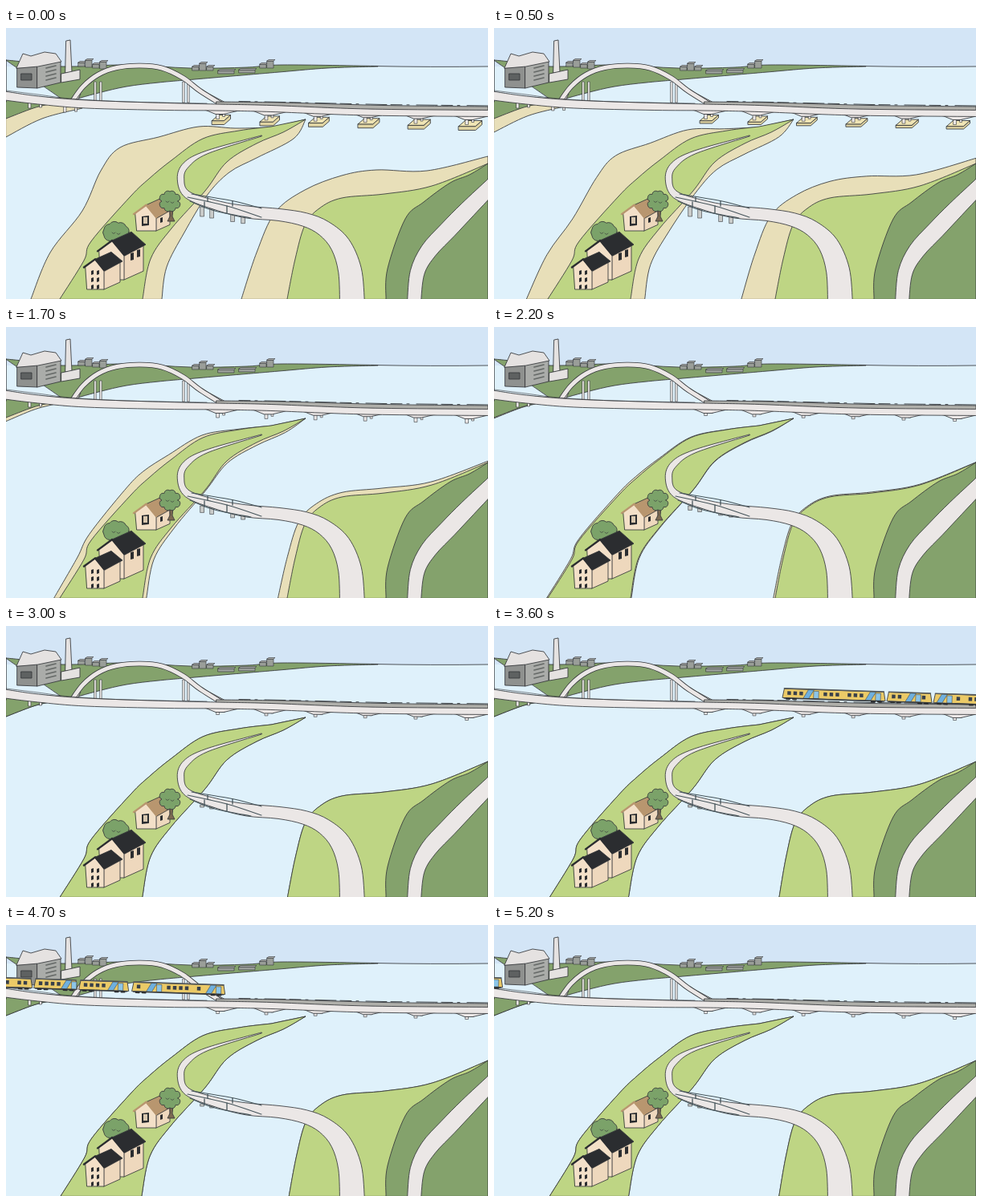
An HTML page for the animation above (5.3 s loop, 600 by 338 pixels).

```html
<!DOCTYPE html>
<html lang="en">
<head>
<meta charset="utf-8">
<title>Rising water</title>
<style>
html, body { margin: 0; width: 100%; height: 100%; overflow: hidden; background: #dff1fb; }
svg { display: block; width: 100vw; height: 100vh; }
path { stroke: #34373a; stroke-width: .85; stroke-linejoin: round; stroke-linecap: round; }
</style>
</head>
<body>
<svg id="stage" viewBox="0 0 600 338" preserveAspectRatio="none"></svg>
<script>
const NS = 'http://www.w3.org/2000/svg', LOOP = 5300, STEP = 100;
const stage = document.getElementById('stage');
const WATER = '#dff1fb', SAND = '#e8dfb9', LIGHT = '#bed584', DARK = '#84a26c', LEAF = '#7ba269',
      ROAD = '#ebe7e6', GREY = '#afafaa', WALL = '#f3e0c8', SIDE = '#eed8bd', INK = '#2b2d30';
const BARE = { stroke: 'none' }, THIN = { strokeWidth: '.6' };

const clamp = v => Math.max(0, Math.min(1, v));
const pts = s => s.split(' ').map(p => p.split(',').map(Number));
const poly = p => 'M' + p.map(q => q.join(' ')).join('L') + 'Z';
const box = (x, y, w, h) => `M${x} ${y}h${w}v${h}h${-w}Z`;
const mix = (a, b, k) => a.map((p, i) => p.map((v, j) => v + (b[i][j] - v) * k));

// Catmull-Rom spline through the points
function curve(p, start = 'M') {
  let d = start + p[0][0] + ' ' + p[0][1];
  for (let i = 0; i < p.length - 1; i++) {
    const a = p[i - 1] || p[i], b = p[i], c = p[i + 1], e = p[i + 2] || c;
    const n = [b[0] + (c[0] - a[0]) / 6, b[1] + (c[1] - a[1]) / 6,
               c[0] - (e[0] - b[0]) / 6, c[1] - (e[1] - b[1]) / 6, c[0], c[1]];
    d += 'C' + n.map(v => v.toFixed(2)).join(' ');
  }
  return d;
}
const ring = (a, b) => curve(a) + curve(b, 'L') + 'Z';

// Outline of a band along x,y,width points
function ribbon(s) {
  const p = pts(s);
  const edge = side => p.map(([x, y, w], i) => {
    const a = p[i - 1] || p[i], b = p[i + 1] || p[i];
    const dx = b[0] - a[0], dy = b[1] - a[1], k = side * w / 2 / Math.hypot(dx, dy);
    return [x - dy * k, y + dx * k];
  });
  return ring(edge(1), edge(-1).reverse());
}

const group = () => stage.appendChild(document.createElementNS(NS, 'g'));
function shape(d, fill = 'none', style = {}, parent = stage) {
  const el = document.createElementNS(NS, 'path');
  el.setAttribute('d', d);
  el.setAttribute('fill', fill);
  Object.assign(el.style, style);
  return parent.appendChild(el);
}

// Each shore runs from a dry edge to the edge of the grass
const shore = (dry, grass) => ({ dry: pts(dry), grass: pts(grass) });
const west = shore('0,136 45,113 95,100', '0,113 34,100 58,94');
const east = shore('293,338 312,280 335,230 372,202 418,184 461,177 524,178 600,160',
                   '350,338 360,288 372,246 390,225 418,212 471,207 530,197 600,169');
const isleLeft = shore('31,338 55,280 95,228 118,178 142,149 190,136 240,123 285,125 330,124',
                       '67,338 97,290 106,266 155,210 178,188 206,165 245,138 290,128 330,123');
const isleRight = shore('373,114 358,138 312,162 278,180 250,209 222,255 200,298 194,338',
                        '373,114 345,130 312,144 275,167 248,203 206,250 180,288 170,338');

// Sky, water and far land
shape(box(0, 0, 600, 338), WATER, BARE);
shape(box(0, 0, 600, 48), '#d3e5f6', BARE);
shape('M455 47.5Q530 49 600 48');
const westSand = shape('', SAND), westGrass = shape('', DARK);
shape(ring(pts('0,40 20,42 70,48 150,46 230,50 300,49 345,46 463,47.5'),
           pts('463,48 400,50 340,55 235,64 190,68 150,73 115,81 75,92')) + 'L0 92Z', DARK);

// Skyline clusters
for (const [x0, y0, n] of [[90, 48, 4], [232, 53, 3], [264, 57, 1], [290, 56, 1], [316, 50, 2]]) {
  for (let i = 0; i < n; i++) {
    const w = n === 1 ? 20 : 8, h = n === 1 ? 4 : 5 + 4 * (i % 2), x = x0 + i * 9, y = y0 - h + (n > 3 ? i : 0);
    shape(box(x, y, w, h), '#9a9e99', THIN);
    shape(`M${x} ${y}l2 -1.5h${w}l-2 1.5Z`, '#b9bbb7', THIN);
  }
}

// Factory
shape(poly(pts('75,16 80,15 82,55 74,56')), '#e5e2e1');
shape(poly(pts('69,57 92,52 92,64 69,68')), '#e5e2e1');
shape(poly(pts('14,49 39,46 39,75 14,74')), '#8f918f');
shape(poly(pts('39,46 68,41 68,68 39,75')), '#aaaca9');
shape(poly(pts('13,50 21,32 31,35 48,30 62,32 69,42 40,48')), '#e5e2e1');
shape(box(19, 57, 13, 8), '#5e6161');
for (let y = 50; y < 70; y += 5) shape(`M50 ${y}l12 -3`, 'none', { stroke: '#656967', strokeWidth: '1.7' });

// Arch
for (const x of [110, 117, 220, 226]) shape(box(x, 67, 2.2, 26), ROAD, THIN);
shape(poly(pts('237,78 245,78 275,94 264,95')), ROAD);
shape(poly(pts('88,83 93,82 88,93 78,92')), ROAD);
const arch = curve(pts('82,92 96,73 115,58 138,49.5 167,47 194,50 220,62 241,78 268,95'));
shape(arch, 'none', { strokeWidth: '6.6' });
shape(arch, 'none', { stroke: ROAD, strokeWidth: '5' });

// Piers get wider towards the right
const piers = Array.from({ length: 6 }, (_, i) => {
  const x = 268 + 60 * i + i * i * .4;
  return { x, y: 103.5 + 1.4 * i, w: 11.5 + .6 * i,
           side: shape('', '#e0d4a2'), top: shape('', '#efe4b4'), legs: shape('', ROAD, THIN) };
});
const westPosts = shape('', ROAD, THIN);

// Deck
shape(curve(pts('262,92 345,93 470,96.5 600,98')) + 'V106L262 97Z', GREY);
shape('M290 91.5L345 92.5L470 95.5L600 97', 'none', { stroke: INK, strokeDasharray: '14 6 3 9 26 5' });
for (const { x, y } of piers) shape(`M${x - 24} ${y - 3}L${x - 7} ${y + 4}h10L${x + 24} ${y - 1}Z`, ROAD);
shape(ribbon('-5,84,11 40,90,10 100,95,10 200,98,9 262,99,8 330,100.5,8 450,105,8 605,106.5,8'), ROAD);
shape(curve(pts('0,78 40,83 80,88 150,92 250,94')), 'none', THIN);

// Train cars: start, length, place of the blue stripe
function makeCar([start, len, stripe]) {
  const g = group();
  shape(`M0 -2L2 -13H${len - 2}L${len} -2Z`, '#ebca67', {}, g);
  shape(`M2 -13.2H${len - 2}`, 'none', { stroke: '#555a5c', strokeWidth: '1.6' }, g);
  const blue = len > 100 ? [stripe, len - 22 - stripe / 9] : [stripe];
  for (const x of blue) {
    shape(`M${x} -2l6 -10.5h7l-6 10.5Z`, '#6fb0de', { strokeWidth: '.5' }, g);
    shape(box(x + 13, -11, 6, 9), '#8cc5e8', { strokeWidth: '.5' }, g);
  }
  for (let x = 6, i = 0; x < len - 6; x += 7.5, i++) {
    if (i % 5 === 4 || blue.some(b => x > b - 5 && x < b + 19)) continue;
    shape(box(x, -10, 4.4, 4.6), '#39404a', BARE, g);
  }
  shape(`M2 -1.2H${len - 2}`, 'none', { stroke: '#3c3f40', strokeWidth: '1.5' }, g);
  for (const x of [5, 13, len - 17, len - 9]) shape(`M${x} -.4h4`, 'none', { stroke: INK, strokeWidth: '2' }, g);
  return { g, start };
}
const cars = [[0, 128, 26], [130, 56, 23], [188, 62, 4], [252, 54, 34], [308, 62, 36], [374, 116, 18]].map(makeCar);

// East bank
const eastSand = shape('', SAND), eastGrass = shape('', LIGHT);
shape(curve(pts('473,338 475,300 497,238 520,217 553,193 577,183 600,169')) + 'V338Z', DARK);
shape(ribbon('508,342,17 512,305,18 526,278,21 550,252,22 575,226,21 606,195,18'), ROAD);

// Island and its road
const isleSand = shape('', SAND), isleGrass = shape('', LIGHT);
const posts = shape('', '#c9cbc9', THIN);
shape(ribbon('318,134.5,1 250,155,4 224,171,8 217.5,188,8.5 226,208,9 265,222,12 300,229.5,15 340,233,15 ' +
             '372,239,17 396,250,20 416,270,25 428,302,29 431,344,31'), ROAD);
for (const r of ['231,207 284,216 318,225', '226,211 275,222 318,236', '229,216 260,228 305,237'])
  shape(curve(pts(r)), 'none', { stroke: '#45545a', strokeWidth: '1.1' });
shape('M251 211v5M282 216v6M247 217v7M275 222v9', 'none', { stroke: '#45545a', strokeWidth: '1.3' });

// Scalloped crown
function tree(cx, cy, rx, ry, n) {
  let d = `M${cx + rx} ${cy}`;
  for (let i = 1; i <= n; i++) {
    const a = i / n * 2 * Math.PI;
    d += `A${rx * .45} ${rx * .45} 0 0 1 ${cx + rx * Math.cos(a)} ${cy + ry * Math.sin(a)}`;
  }
  shape(d + 'Z', LEAF);
  shape(`M${cx - 5} ${cy}q2 3 4 0m2 1q2 3 4 0`, 'none', THIN);
}

// Gabled house seen from its corner; x, y is the foot of that corner
function house(x, y, front, side, h, roof) {
  const top = y - h, left = x - front, lift = front * .15, back = side * .45;
  const apex = [x - front * .48, top - front * .55], ridge = [apex[0] + side, apex[1] - back];
  shape(poly([[x, top], [x + side, top - back], [x + side, y - back], [x, y]]), SIDE);
  shape(poly([[left, top - lift], apex, [x, top], [x, y], [left + 2, y]]), WALL);
  shape(poly([apex, ridge, [x + side + 3, top - back - 1], [x + 1, top + 2]]), roof);
  shape(`M${left - 2} ${top - lift + 1}L${apex[0]} ${apex[1]}L${x} ${top + 1}`, 'none', { stroke: roof, strokeWidth: '2.4' });
}
const pane = (x, y, w, h) => shape(`M${x} ${y}l${w} -1v${h}l${-w} 1Z`, INK, BARE);

house(187, 253, 26, 17, 18, '#b8966f');
pane(169, 235, 9, 12);
pane(192, 237, 3, 6);
shape(box(171, 236, 5, 8), '#d8c7ae', BARE);
shape(poly(pts('204,226 208,226 207,235 210,241 201,241 204,235')), '#7d6a52');
tree(204, 216, 10, 12, 8);
tree(137, 255, 16, 12, 9);
house(147, 314, 31, 24, 32, INK);
for (const x of [155, 163]) pane(x, 291 - (x - 155) / 2 - 10, 4, 9);
house(122, 326, 23, 20, 25, INK);
for (let i = 0; i < 6; i++) pane(106 + i % 2 * 7, 303 + (i >> 1) * 9, 3, 5);

// Lapping moves the lower part of a shore sideways
const lap = (p, w) => p.map(([x, y]) => [x + w * clamp((y - 150) / 188), y]);

function drawWater(t) {
  const flood = 1 - (1 - clamp(t / 2400)) ** 1.3;
  const swell = clamp((t - 2200) / 800) * 2.5 * (1 + Math.cos((t - 3600) / 1500 * 2 * Math.PI));
  const edges = (s, w) => {
    const grass = lap(s.grass, w);
    return [mix(s.dry, grass, flood), grass];
  };
  const bank = (els, s, w, close) => edges(s, w).forEach((p, i) => els[i].setAttribute('d', curve(p) + close));
  bank([westSand, westGrass], west, 0, 'L70 88L0 84Z');
  bank([eastSand, eastGrass], east, swell, 'V338Z');
  const left = edges(isleLeft, swell / 2), right = edges(isleRight, -swell / 2);
  [isleSand, isleGrass].forEach((el, i) => el.setAttribute('d', ring(left[i], right[i])));

  const h = 5 * (1 - t / 1700), leg = 7 + 3 * clamp((2200 - t) / 600);
  for (const { x, y, w, side, top, legs } of piers) {
    const b = y + 12, show = h > 0 ? '' : 'none';
    side.style.display = top.style.display = show;
    side.setAttribute('d', `M${x - w} ${b}H${x + w - 8}L${x + w} ${b - 7}v${h}l-8 7H${x - w}Z`);
    top.setAttribute('d', `M${x - w} ${b}l8 -7H${x + w}l-8 7Z`);
    legs.setAttribute('d', box(x - 6, y, 3.5, leg) + box(x + 2, y, 2.5, leg - 3));
  }

  const p = 9 * clamp(1 - t / 2200), q = 9 * clamp((2600 - t) / 1500);
  westPosts.setAttribute('d', box(28, 93, 3, 7) + box(42, 94, 2.5, 5) +
    (p > 0 ? box(72, 96, 3, p) + box(86, 97, 2.5, p * .8) : ''));
  posts.setAttribute('d', [242, 254, 280, 293].map(x => box(x, 223 + (x - 242) * .17, 4.5, q + 3)).join(''));
}

function drawTrain(t) {
  const front = 359 - .524 * (t - 3600), slope = .0335;
  for (const { g, start } of cars) {
    const x = front + start;
    g.style.display = x < 605 ? '' : 'none';
    g.setAttribute('transform', `translate(${x} ${79 + x * slope}) rotate(${Math.atan(slope) * 180 / Math.PI})`);
  }
}

const begin = performance.now();
function render(now) {
  const t = Math.floor((Math.max(0, now - begin) % LOOP) / STEP) * STEP;
  drawWater(t);
  drawTrain(t);
  requestAnimationFrame(render);
}
render(begin);
</script>
</body>
</html>
```
